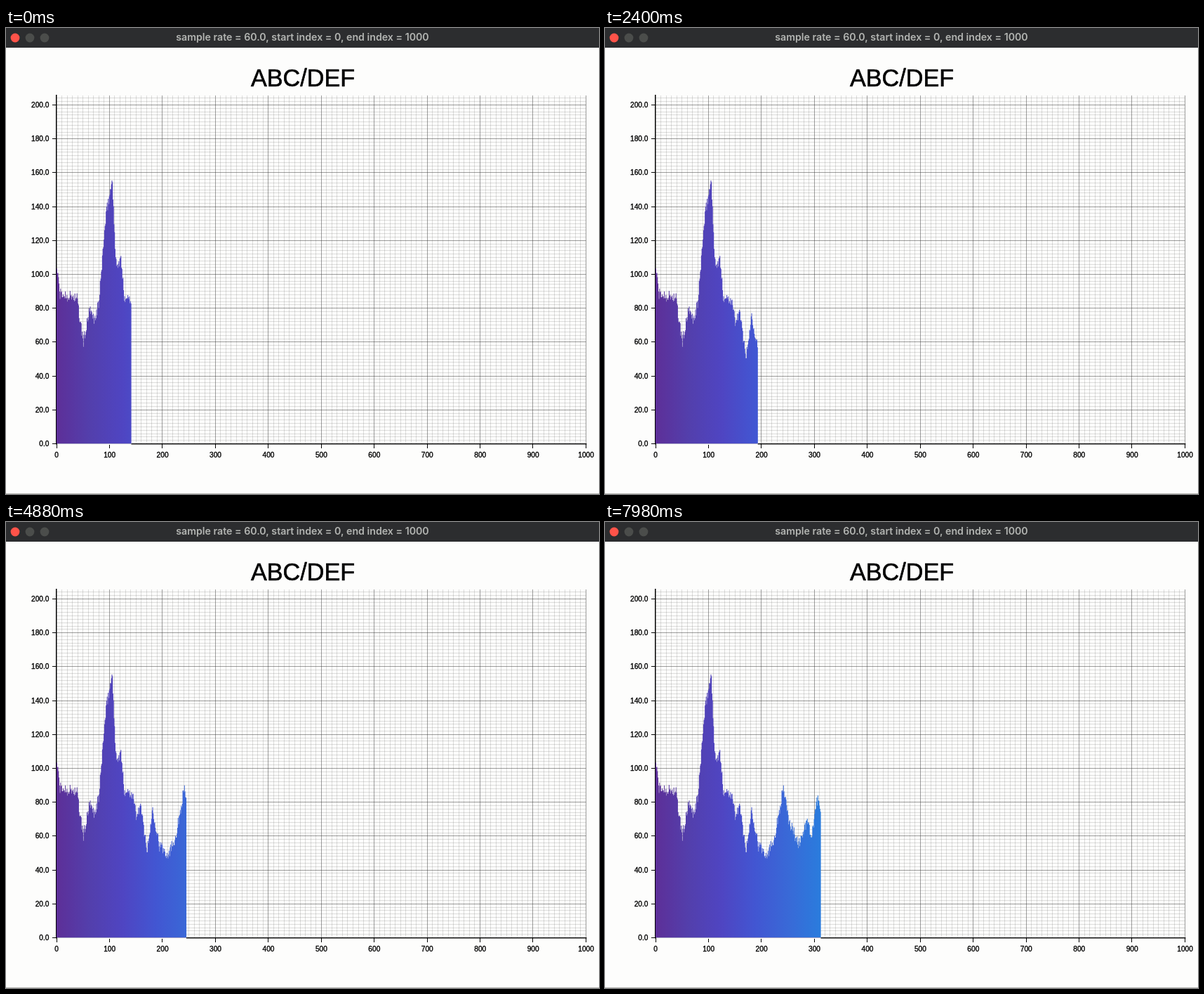
Animation, 845 px wide and 663 px high, one loop 8000 ms. Source, as an HTML page with a canvas:

```html
<!DOCTYPE html>
<html lang="en">
<head>
<meta charset="utf-8">
<style>
  html, body { margin: 0; width: 100%; height: 100%; overflow: hidden; background: #fdfdfc; }
  canvas { display: block; }
</style>
</head>
<body>
<canvas id="stage" width="845" height="663"></canvas>
<script>
const ctx = document.getElementById('stage').getContext('2d');
const LOOP = 8000, FIRST_COUNT = 141;
const LEFT = 72, RIGHT = 826.4, TOP = 96, BASE = 591;
const UNIT_X = 0.7544, UNIT_Y = 2.41;
const PAPER = '#fdfdfc', INK = '#000';
const SANS = '"Liberation Sans", Arial, sans-serif';

// Turning points of the signal as [sample index, level].
const turns = [
  [0, 104], [6, 88], [38, 86], [42, 76], [50, 60], [62, 78], [72, 73], [80, 84],
  [88, 118], [94, 137], [105, 156], [110, 113], [115, 104], [121, 109], [127, 87],
  [143, 85], [151, 70], [157, 79], [171, 51], [181, 76], [194, 54], [210, 49],
  [225, 60], [241, 89], [250, 70], [270, 55], [287, 69], [294, 57], [304, 82], [312, 76]
];

const gridX = v => LEFT + v * UNIT_X;
const gridY = v => BASE - v * UNIT_Y;
const noise = i => {
  const n = Math.sin(i * 12.9898 + 4.1) * 43758.5453;
  return (n - Math.floor(n)) * 2 - 1;
};

function levelAt(index) {
  const next = Math.max(1, turns.findIndex(([i]) => i >= index));
  const [i0, v0] = turns[next - 1], [i1, v1] = turns[next];
  return v0 + (v1 - v0) * (index - i0) / (i1 - i0) + 3.5 * noise(index);
}

function rect(x, y, w, h, color) {
  ctx.fillStyle = color;
  ctx.fillRect(x, y, w, h);
}

function text(str, x, y, font, color, align, weight) {
  ctx.font = font;
  ctx.textAlign = align;
  ctx.fillStyle = ctx.strokeStyle = color;
  ctx.fillText(str, x, y);
  if (weight) {
    ctx.lineWidth = weight;
    ctx.strokeText(str, x, y);
  }
}

const label = (str, x, y, align) => text(str, x, y, '10.2px ' + SANS, INK, align, 0.35);

function drawWindow() {
  rect(0, 0, 845, 663, PAPER);
  rect(0, 0, 845, 28, '#2c2d2f');
  rect(0, 662, 845, 1, '#b9b9b5');
  [[13, '#ff5349'], [34, '#4b4d4b'], [55, '#4b4d4b']].forEach(([x, color]) => {
    ctx.fillStyle = color;
    ctx.beginPath();
    ctx.arc(x, 14, 6.4, 0, Math.PI * 2);
    ctx.fill();
  });
  text('sample rate = 60.0, start index = 0, end index = 1000', 422.5, 18,
    '600 14.2px Inter, sans-serif', '#b3b5b2', 'center');
  text('ABC/DEF', 423, 82.5, '34.2px ' + SANS, INK, 'center', 0.6);
}

function drawGrid() {
  const vertical = (v, color) => rect(Math.floor(gridX(v)), TOP, 1, BASE - TOP, color);
  const horizontal = (v, color) => rect(LEFT, Math.round(gridY(v)), RIGHT - LEFT, 1, color);
  const minor = 'rgba(90, 90, 90, .2)', major = 'rgba(60, 60, 60, .5)';
  for (let v = 10; v <= 1000; v += 10) vertical(v, v % 100 ? minor : major);
  for (let v = 2; v < 206; v += 2) horizontal(v, v % 20 ? minor : major);
}

function drawAxes() {
  rect(71, 95, 1.5, 497, INK);
  rect(71, BASE, RIGHT - 70, 1.4, INK);
  for (let v = 0; v <= 1000; v += 100) {
    rect(Math.floor(gridX(v)), 592, 1, 6, INK);
    label(String(v), gridX(v) + 0.2, 611, 'center');
  }
  for (let v = 0; v <= 200; v += 20) {
    rect(66, Math.round(gridY(v)), 6, 1, INK);
    label(v.toFixed(1), 61.5, gridY(v) + 4, 'right');
  }
}

const barFill = ctx.createLinearGradient(LEFT, 0, 308, 0);
['#5d2f98', '#533fac', '#4f45c2', '#4256d2', '#3969d7', '#2a7cdd']
  .forEach((color, i, all) => barFill.addColorStop(i / (all.length - 1), color));

function drawBars(count) {
  ctx.beginPath();
  for (let i = 0; i < count; i++) {
    const y = gridY(levelAt(i));
    ctx.rect(gridX(i), y, 1, BASE - y);
  }
  ctx.fillStyle = barFill;
  ctx.fill();
  // The bars hide the axis, leaving a pale edge below them.
  rect(LEFT + 1, BASE, count * UNIT_X - 1, 2, PAPER);
  rect(LEFT + 1, BASE, count * UNIT_X - 1, 1, '#a9a6c8');
}

// Samples arrive in threes: two short waits of 20 ms, then one of 100 ms.
function sampleCount(ms) {
  const t = ms + 22;
  return FIRST_COUNT - 1 + 3 * Math.floor(t / 140) + Math.min(2, Math.floor(t % 140 / 20));
}

function frame() {
  drawWindow();
  drawGrid();
  drawAxes();
  drawBars(sampleCount(performance.now() % LOOP));
  requestAnimationFrame(frame);
}
frame();
</script>
</body>
</html>
```
